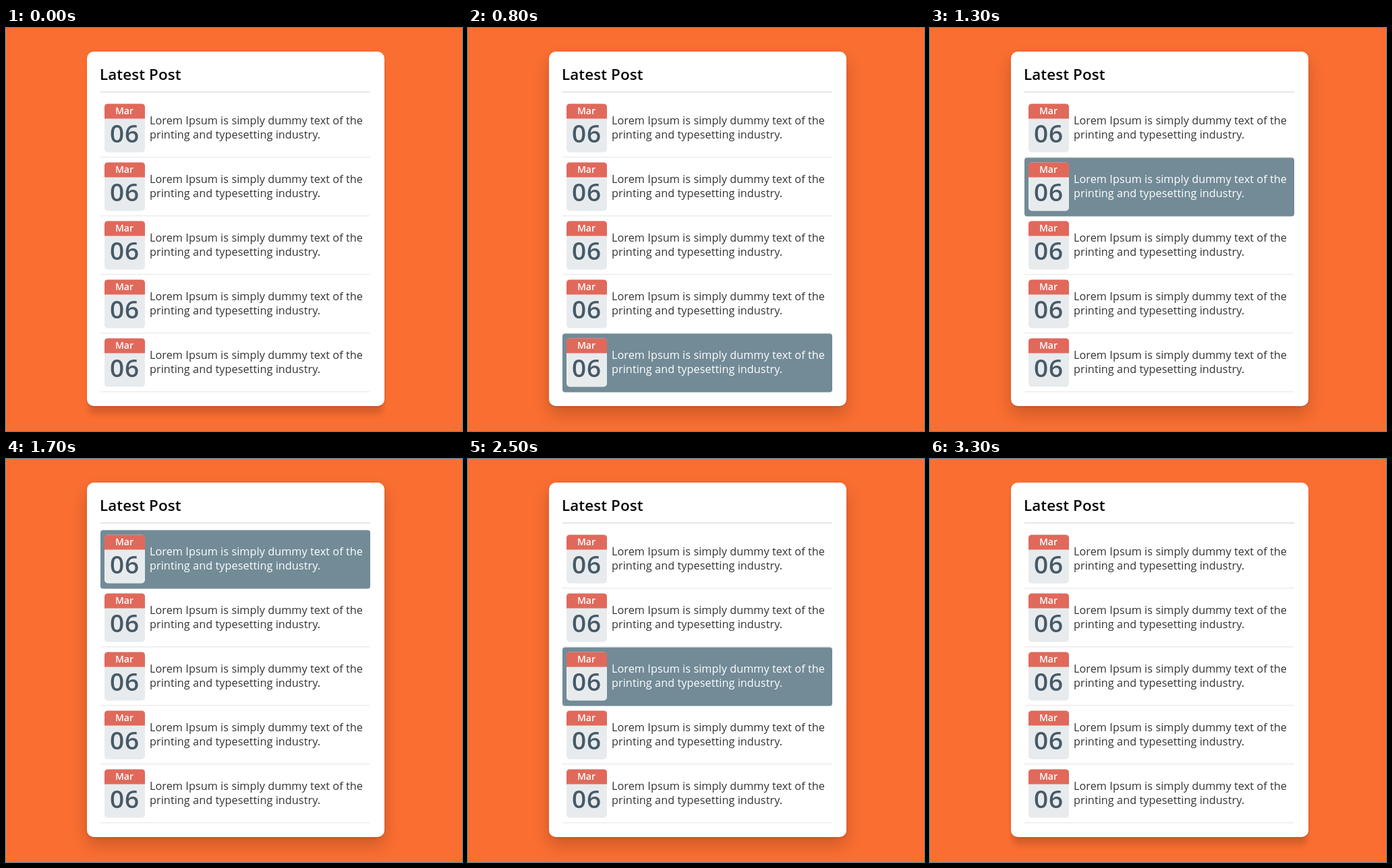
An HTML page for the animation above (3.4 s loop, 676 by 598 pixels).

```html
<!DOCTYPE html>
<html lang="en">
<head>
<meta charset="utf-8">
<title>Latest Post</title>
<style>
  html, body { margin: 0; width: 100%; height: 100%; overflow: hidden; background: #fa6e31; }
  #card { position: absolute; left: 119.5px; top: 35px; width: 441px; height: 526px; border-radius: 10px; background: #fff; }
  svg { position: absolute; left: 0; top: 0; }
  text { font-family: "Open Sans", "Noto Sans", sans-serif; font-size: 16.2px; fill: #333; }
  .title { font-size: 22.4px; font-weight: 600; letter-spacing: .1px; fill: #050505; }
  .month, .day { font-weight: 600; text-anchor: middle; }
  .month { font-size: 14px; fill: #fff; }
  .day { font-size: 37px; letter-spacing: 1px; fill: #465a68; }
  .copy { letter-spacing: .08px; }
  .line { fill: #eee; }
  .back { fill: #728b97; visibility: hidden; }
  .on .back { visibility: visible; }
  .on .copy { fill: #fff; }
  .on .line { visibility: hidden; }
</style>
</head>
<body>
<div id="card"></div>
<svg width="676" height="598">
  <text class="title" x="139" y="76.5">Latest Post</text>
  <rect x="140" y="94" width="400" height="2" fill="#e6e6e6"/>
  <g id="list"></g>
</svg>
<script>
const LOOP = 3400, STEP = 100, PITCH = 87;
const card = document.getElementById('card');
const list = document.getElementById('list');

list.innerHTML = Array.from({ length: 5 }, (_, i) => `
  <g transform="translate(140 ${105.5 + i * PITCH})">
    <rect class="line" y="85.3" width="399" height="1.7"/>
    <rect class="back" width="400" height="${PITCH}" rx="4"/>
    <rect x="6" y="7" width="60" height="72" rx="5" fill="#e8ebed"/>
    <path d="M6 29V12q0-5 5-5h50q5 0 5 5v17z" fill="#e0695b"/>
    <text class="month" x="35.5" y="22.5">Mar</text>
    <text class="day" x="36" y="64.5">06</text>
    <text class="copy" x="73" y="37.5">Lorem Ipsum is simply dummy text of the</text>
    <text class="copy" x="73" y="58.5">printing and typesetting industry.</text>
  </g>`).join('');
const rows = [...list.children];

// Pointer path: [start time, hovered row], -1 for none
const hovers = [
  [0, -1], [200, 0], [300, 1], [400, 2], [600, 3], [700, 4], [1000, 3], [1100, 2],
  [1200, 1], [1500, 0], [1800, 1], [2300, 2], [2600, 3], [2700, 4], [3000, -1]
];

const ease = x => {
  const p = Math.min(1, Math.max(0, x));
  return p * p * (3 - 2 * p);
};
const mix = (a, b, p) => a + (b - a) * p;

function draw(t) {
  const active = hovers.filter(h => h[0] <= t).pop()[1];
  rows.forEach((row, i) => row.classList.toggle('on', i === active));

  const lift = ease(t / 400) * (1 - ease((t - 2900) / 500));
  card.style.boxShadow = `0 1px 3px rgba(0,0,0,.12),
    0 ${mix(15, 12, lift)}px ${mix(8, 24, lift)}px ${mix(-3, 0, lift)}px rgba(0,0,0,${mix(.14, .19, lift)})`;
}

function tick() {
  const t = performance.now() % LOOP;
  draw(Math.floor(t / STEP) * STEP);
  requestAnimationFrame(tick);
}
tick();
</script>
</body>
</html>
```
